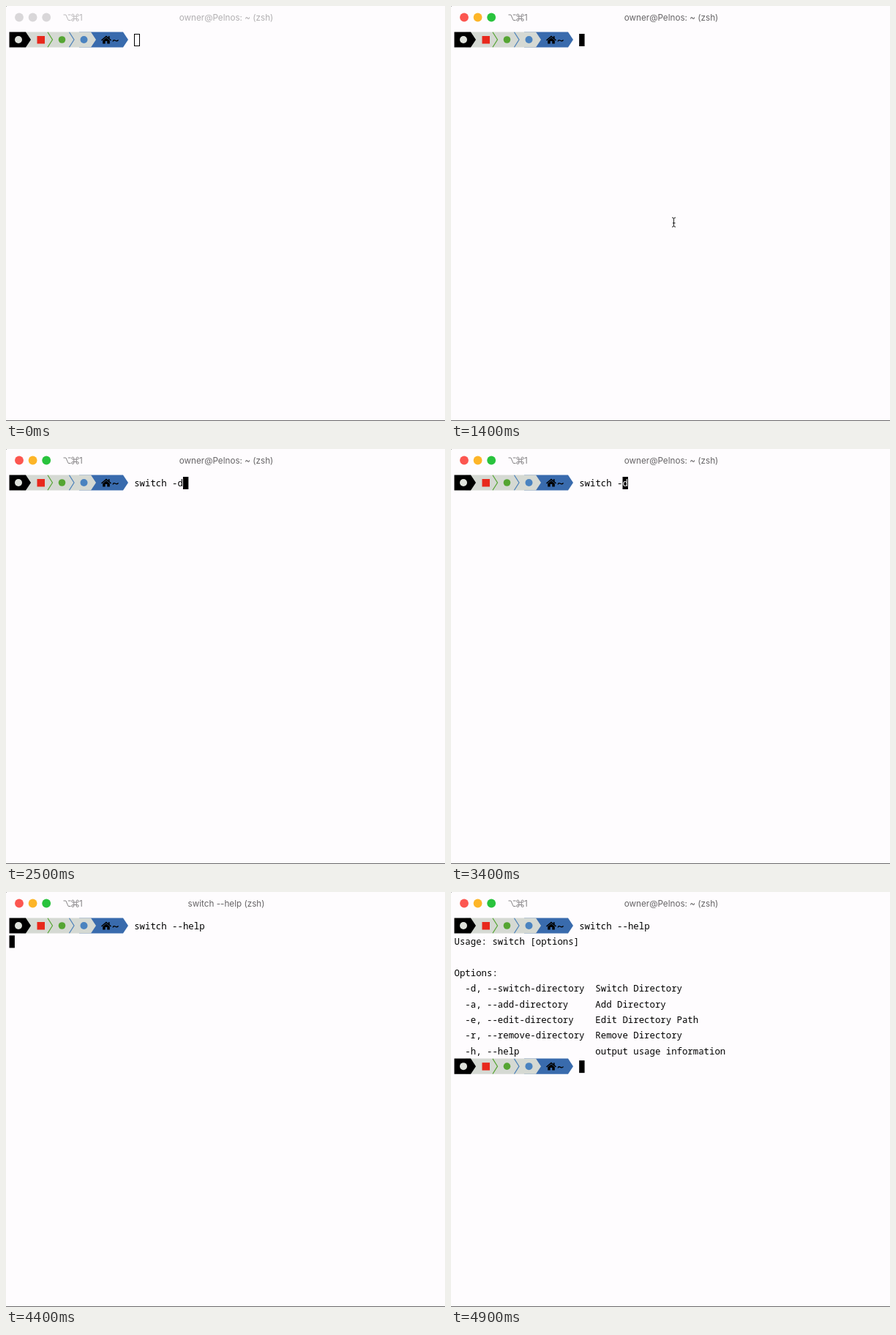
Recreate the animation shown at these times as an HTML page with a canvas. Size 600 by 567 pixels, loop 5000 ms.

```html
<!DOCTYPE html>
<html lang="en">
<head>
<meta charset="utf-8">
<title>Terminal</title>
<style>
html, body { margin: 0; width: 100%; height: 100%; overflow: hidden; background: #fefcfe; }
canvas { display: block; width: 600px; height: 567px; }
</style>
</head>
<body>
<canvas id="stage"></canvas>
<script>
const W = 600, H = 567, LOOP = 5000, STEP = 100;
const CELL = 7.42, ROW = 21.35, LEFT = 4.5, INPUT = 23;
const MONO = '12.37px "Noto Sans Mono", monospace';
const SANS = '11.7px Inter, sans-serif';
const BG = '#fefcfe', INK = '#000', GREY = '#d5d9d3', BLUE = '#396bad', GREEN = '#55a532';
const HOME_TITLE = 'owner@Pelnos: ~ (zsh)';
const COMMAND = 'switch --help';
const HELP = [
  'Usage: switch [options]',
  '',
  'Options:',
  '  -d, --switch-directory  Switch Directory',
  '  -a, --add-directory     Add Directory',
  '  -e, --edit-directory    Edit Directory Path',
  '  -r, --remove-directory  Remove Directory',
  '  -h, --help              output usage information'
];
// Times in ms
const ENTER = 100, ARRIVE = 1000, FOCUS = 1100, TYPE = 1600, ERASE = 3000,
      RETYPE = 3600, RUN = 4300, OUTPUT = 4600;

const canvas = document.getElementById('stage');
const ctx = canvas.getContext('2d');
const dpr = window.devicePixelRatio || 1;
canvas.width = W * dpr;
canvas.height = H * dpr;

const colX = col => LEFT + col * CELL;

function path(points, close) {
  ctx.beginPath();
  points.forEach(([x, y], i) => i ? ctx.lineTo(x, y) : ctx.moveTo(x, y));
  if (close) ctx.closePath();
}

function fillPoly(points, color) {
  path(points, true);
  ctx.fillStyle = color;
  ctx.fill();
}

function strokeLine(points, color, width) {
  path(points);
  ctx.strokeStyle = color;
  ctx.lineWidth = width;
  ctx.stroke();
}

function disc(x, y, r, color) {
  ctx.beginPath();
  ctx.arc(x, y, r, 0, Math.PI * 2);
  ctx.fillStyle = color;
  ctx.fill();
}

function label(text, x, y, font, color, align = 'left') {
  ctx.font = font;
  ctx.textAlign = align;
  ctx.fillStyle = color;
  ctx.fillText(text, x, y);
}

function mono(text, col, row, color = INK) {
  label(text, colX(col), 51 + row * ROW, MONO, color);
}

function block(col, row, solid) {
  const x = colX(col), y = 38 + row * ROW;
  if (solid) {
    ctx.fillStyle = INK;
    ctx.fillRect(x, y, CELL, 17);
  } else {
    ctx.strokeStyle = INK;
    ctx.lineWidth = 1;
    ctx.strokeRect(175.5, y + 0.5, 7, 16);
  }
}

function shortcut(color) {
  strokeLine([[78.5, 12], [81.8, 12], [85.2, 19.5], [88.5, 19.5]], color, 1);
  strokeLine([[84.8, 12], [88.5, 12]], color, 1);
  const cx = 94.5, cy = 15.8, q = 1.7, r = 1.5;
  ctx.strokeRect(cx - q, cy - q, q * 2, q * 2);
  for (const sx of [-1, 1]) {
    for (const sy of [-1, 1]) {
      ctx.beginPath();
      ctx.arc(cx + sx * (q + r), cy + sy * (q + r), r, 0, Math.PI * 2);
      ctx.stroke();
    }
  }
  label('1', 100, 20, SANS, color);
}

function titleBar(title, active) {
  const lights = active ? ['#fc5650', '#fdb528', '#29c33d'] : Array(3).fill('#d9d7d9');
  lights.forEach((color, i) => disc(18 + i * 18.6, 15.5, 5.9, color));
  shortcut(active ? '#858385' : '#b9b7b9');
  label(title, 301, 20, SANS, active ? '#666466' : '#b1afb1', 'center');
}

function segment(x, body, color) {
  fillPoly([[x, 0], [body, 0], [body + 7, 10.6], [body, 21.2], [x, 21.2]], color);
}

function house() {
  fillPoly([[137, 5], [144, 11], [143, 12], [137, 7], [131, 12], [130, 11]], INK);
  ctx.fillRect(139.8, 5.8, 1.8, 3.5);
  fillPoly([[137, 7.8], [141.8, 11.8], [141.8, 16], [138.3, 16], [138.3, 12.5],
            [135.7, 12.5], [135.7, 16], [132.2, 16], [132.2, 11.8]], INK);
}

function prompt(row) {
  ctx.save();
  ctx.translate(0, 35.4 + row * ROW);
  segment(100, 160, BLUE);
  segment(20, 116, GREY);
  segment(LEFT, 27, INK);
  [[57, GREEN], [86.5, '#4a7fb9']].forEach(([x, color]) =>
    strokeLine([[x, 0.3], [x + 6.5, 10.6], [x, 20.9]], color, 1.2));
  disc(17, 10.6, 5, '#dfe2dc');
  ctx.fillStyle = '#e8281c';
  ctx.fillRect(42.5, 5.6, 10.5, 10.5);
  disc(76.5, 10.6, 4.8, GREEN);
  disc(106.5, 10.6, 5, '#4a83c0');
  house();
  ctx.beginPath();
  ctx.moveTo(146, 13);
  ctx.bezierCurveTo(148, 8, 151, 15.5, 153.5, 11);
  ctx.strokeStyle = INK;
  ctx.lineWidth = 1.3;
  ctx.stroke();
  ctx.restore();
}

function arrow(x, y) {
  ctx.save();
  ctx.translate(x, y);
  path([[0.5, 0], [0.5, 12.6], [3.2, 10.2], [5.3, 15], [7.3, 14.1], [5.2, 9.4], [8.8, 9.2]], true);
  ctx.shadowColor = 'rgba(0,0,0,0.35)';
  ctx.shadowBlur = 2 * dpr;
  ctx.shadowOffsetY = dpr;
  ctx.strokeStyle = '#fff';
  ctx.lineWidth = 1.6;
  ctx.stroke();
  ctx.shadowColor = 'transparent';
  ctx.fillStyle = INK;
  ctx.fill();
  ctx.restore();
}

function beam(x, y) {
  ctx.save();
  ctx.translate(x + 0.5, y);
  ctx.strokeStyle = '#222';
  ctx.lineWidth = 1;
  ctx.beginPath();
  for (const s of [-1, 1]) {
    ctx.moveTo(-2.5, s * 6.5);
    ctx.quadraticCurveTo(0, s * 6.5, 0, s * 4.5);
    ctx.quadraticCurveTo(0, s * 6.5, 2.5, s * 6.5);
  }
  ctx.moveTo(0, -5);
  ctx.lineTo(0, 5);
  ctx.moveTo(-1.5, 1);
  ctx.lineTo(2, 1);
  ctx.stroke();
  ctx.restore();
}

function mouse(t) {
  if (t < ENTER || t >= TYPE) return;
  if (t >= FOCUS) return beam(304, 295.5);
  const left = Math.max(0, (ARRIVE - t) / (ARRIVE - ENTER));
  arrow(304 + 104 * left ** 1.8, 296 + 225 * left ** 1.9);
}

function inputAt(t) {
  const count = start => Math.floor((t - start) / STEP) + 1;
  if (t < TYPE) return '';
  if (t < ERASE) return 'switch -d'.slice(0, count(TYPE));
  if (t < RETYPE) return 'switch -';
  return COMMAND.slice(0, 8 + count(RETYPE));
}

function draw(t) {
  const active = t >= FOCUS;
  const running = t >= RUN && t < OUTPUT;
  const input = inputAt(t);
  ctx.setTransform(dpr, 0, 0, dpr, 0, 0);
  ctx.fillStyle = BG;
  ctx.fillRect(0, 0, W, H);
  ctx.fillStyle = '#6a686a';
  ctx.fillRect(0, 566, W, 1);
  ctx.fillStyle = '#aaa8aa';
  ctx.fillRect(0, 0, 1, 1);

  titleBar(running ? COMMAND + ' (zsh)' : HOME_TITLE, active);
  prompt(0);
  mono(input, INPUT, 0);
  if (t >= OUTPUT) {
    HELP.forEach((line, i) => mono(line, 0, i + 1));
    prompt(9);
    block(INPUT, 9, true);
  } else if (running) {
    block(0, 1, true);
  } else {
    block(INPUT + input.length, 0, active);
    // The suggested letter shows through the cursor
    if (t >= ERASE && t < RETYPE) mono('d', INPUT + input.length, 0, '#fff');
  }
  mouse(t);
}

const start = performance.now();
function tick() {
  const t = (performance.now() - start) % LOOP;
  draw(Math.floor(t / STEP) * STEP);
  requestAnimationFrame(tick);
}
tick();
</script>
</body>
</html>
```
